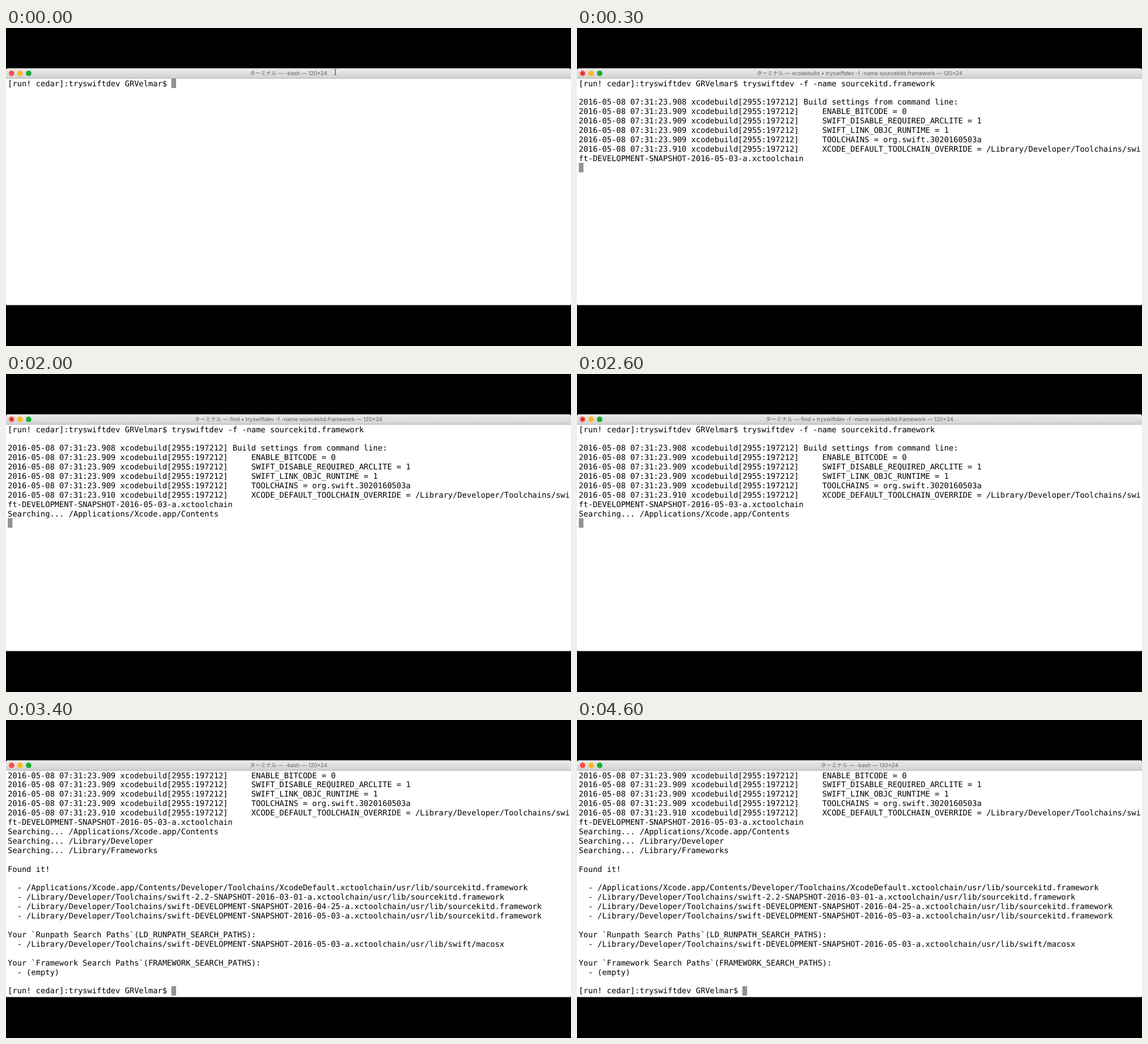
Recreate the animation shown at these times as an HTML page with a canvas. Size 960 px wide and 540 px high, loop 4.7 s.

```html
<!DOCTYPE html>
<html lang="ja">
<head>
<meta charset="utf-8">
<title>Terminal</title>
<style>
html, body { margin: 0; width: 100%; height: 100%; overflow: hidden; background: #000; }
#stage { position: relative; width: 960px; height: 540px; overflow: hidden; background: #000; }
#window { position: absolute; left: 0; top: 68px; width: 960px; height: 401px; background: #fff; overflow: hidden;
  border: solid #888; border-width: 1px 0; border-radius: 4px 4px 2px 2px; }
#bar { position: absolute; left: 0; top: 0; width: 960px; height: 16px; background: linear-gradient(#ebebeb, #d2d2d2); border-bottom: 1px solid #b4b4b4; }
#title { position: absolute; left: 0; top: 1px; width: 960px; text-align: center; white-space: pre; color: #606060;
  font: 9.15px/16px Inter, "Noto Sans CJK JP", "Noto Sans CJK", sans-serif; text-rendering: geometricPrecision; }
#screen { position: absolute; left: 3px; top: 18.5px; margin: 0; color: #000;
  font: 13.22px/15.91px "DejaVu Sans Mono", monospace; text-rendering: geometricPrecision; font-variant-ligatures: none; }
#caret { position: absolute; width: 8px; height: 16px; background: #929292; }
canvas { position: absolute; left: 0; top: 0; }
</style>
</head>
<body>
<div id="stage">
  <div id="window">
    <div id="bar"></div>
    <div id="title"></div>
    <div id="caret"></div>
    <pre id="screen"></pre>
  </div>
  <canvas id="shapes" width="960" height="100"></canvas>
</div>
<script>
const LOOP = 4700, ROWS = 24, CELL = 7.959, ROW = 15.91;
const $ = id => document.getElementById(id);
const ctx = $("shapes").getContext("2d");

const prompt = "[run! cedar]:tryswiftdev GRVelmar$ ";
const command = "tryswiftdev -f -name sourcekitd.framework";
const log = (ms, text) => `2016-05-08 07:31:23.${ms} xcodebuild[2955:197212] ${text}`;
const setting = (ms, text) => log(ms, "    " + text);
const chains = "/Library/Developer/Toolchains/";
const snapshot = date => `${chains}swift-DEVELOPMENT-SNAPSHOT-${date}-a.xctoolchain/usr/lib/`;
const item = path => "  - " + path;
const kit = "sourcekitd.framework";

const entered = [prompt + command, ""];
const built = [
  ...entered,
  log(908, "Build settings from command line:"),
  setting(909, "ENABLE_BITCODE = 0"),
  setting(909, "SWIFT_DISABLE_REQUIRED_ARCLITE = 1"),
  setting(909, "SWIFT_LINK_OBJC_RUNTIME = 1"),
  setting(909, "TOOLCHAINS = org.swift.3020160503a"),
  setting(910, `XCODE_DEFAULT_TOOLCHAIN_OVERRIDE = ${chains}swi`),
  "ft-DEVELOPMENT-SNAPSHOT-2016-05-03-a.xctoolchain"
];
const searchApp = [...built, "Searching... /Applications/Xcode.app/Contents"];
const searchDev = [...searchApp, "Searching... /Library/Developer"];
const finished = [
  ...searchDev,
  "Searching... /Library/Frameworks",
  "",
  "Found it!",
  "",
  item("/Applications/Xcode.app/Contents/Developer/Toolchains/XcodeDefault.xctoolchain/usr/lib/" + kit),
  item(chains + "swift-2.2-SNAPSHOT-2016-03-01-a.xctoolchain/usr/lib/" + kit),
  item(snapshot("2016-04-25") + kit),
  item(snapshot("2016-05-03") + kit),
  "",
  "Your `Runpath Search Paths`(LD_RUNPATH_SEARCH_PATHS):",
  item(snapshot("2016-05-03") + "swift/macosx"),
  "",
  "Your `Framework Search Paths`(FRAMEWORK_SEARCH_PATHS):",
  item("(empty)"),
  "",
  prompt
];

// The caret sits at the end of the last line.
const states = [
  { at: 0, job: "", lines: [prompt], pointer: true },
  { at: 100, job: "", lines: [prompt + command] },
  { at: 200, job: "xcodebuild", lines: entered },
  { at: 300, job: "xcodebuild", lines: [...built, ""] },
  { at: 2000, job: "find", lines: [...searchApp, ""] },
  { at: 3200, job: "find", lines: [...searchDev, ""] },
  { at: 3400, job: "", lines: finished }
];

function disc(x, y, r, color) {
  ctx.fillStyle = color;
  ctx.beginPath();
  ctx.arc(x, y, r, 0, Math.PI * 2);
  ctx.fill();
}

function drawPointer(x, y) {
  ctx.strokeStyle = "#444";
  ctx.lineWidth = 1;
  ctx.beginPath();
  for (const s of [-1, 1]) {
    ctx.moveTo(x - 2, y + s * 5);
    ctx.lineTo(x, y + s * 4);
    ctx.lineTo(x + 2, y + s * 5);
  }
  ctx.moveTo(x, y - 4);
  ctx.lineTo(x, y + 4);
  ctx.stroke();
}

function render({ job, lines, pointer }) {
  const name = job ? `${job} • ${command}` : "-bash";
  $("title").textContent = `ターミナル — ${name} — 120×24`;

  const view = lines.slice(-ROWS);
  $("screen").textContent = view.join("\n");
  const last = view.length - 1;
  $("caret").style.left = Math.floor(3 + view[last].length * CELL) + "px";
  $("caret").style.top = 17 + last * ROW + "px";

  ctx.clearRect(0, 0, 960, 100);
  disc(9.5, 77, 4.7, "#fb5148");
  disc(24, 77, 4.7, "#fdb924");
  disc(38.5, 77, 4.7, "#17ad37");
  if (job) disc(9.5, 77, 1.5, "#7d0d0a");
  if (pointer) drawPointer(559.5, 75);
}

let shown = null;
function tick() {
  const t = performance.now() % LOOP;
  const state = states.filter(s => s.at <= t).pop();
  if (state !== shown) render(shown = state);
  requestAnimationFrame(tick);
}
tick();
</script>
</body>
</html>
```
